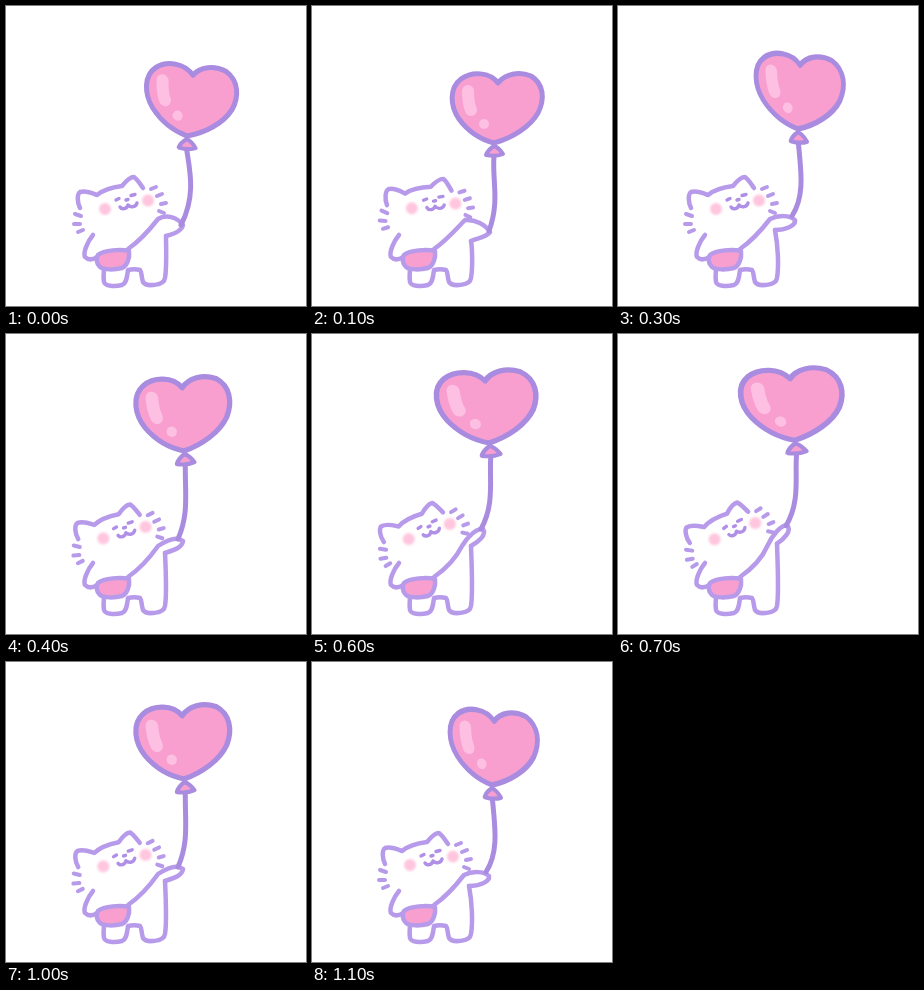
Recreate the animation shown at these times as an HTML page. Size 300 px wide and 300 px high, loop 1200 ms.

```html
<!DOCTYPE html>
<html lang="en">
<head>
<meta charset="utf-8">
<title>Cat with a heart balloon</title>
<style>
html, body { margin: 0; width: 100%; height: 100%; overflow: hidden; background: #fff; }
svg { display: block; width: 100vw; height: 100vh; }
path { fill: none; stroke-linecap: round; stroke-linejoin: round; }
.cat { stroke: #b79bea; stroke-width: 4.5; }
.fur { stroke: #b79bea; stroke-width: 4; }
.face { stroke: #b08fe6; stroke-width: 3.4; }
.balloon { stroke: #a98ce0; stroke-width: 5; }
.pink { fill: #f89fd0; }
.shine { stroke: #fdc0e2; stroke-width: 12; }
.dot { stroke: #fdc0e2; stroke-width: 10; }
.blush { stroke: #ffc6de; stroke-width: 12; filter: blur(1px); }
</style>
</head>
<body>
<svg viewBox="0 0 300 300">
  <path class="cat" id="body"/>
  <path class="cat" d="M87 229C81 236 77 247 79 251C83 255 88 253 91 251"/>
  <path class="cat" id="arm"/>
  <path class="cat pink" d="M92 249C98 244 115 243 123 245C124 252 121 260 116 262C108 264 98 264 94 261C90 257 90 252 92 249Z"/>
  <g id="head">
    <path class="cat" d="M73 202C70 196 70 188 73 186C79 184 85 187 90 189C97 183 107 181 115 180C119 175 123 171 127 171C131 174 133 178 136 182"/>
    <path class="fur" d="M68 208L74 210M67 218L73 218M71 226L76 224M144 183L149 181M150 190L155 188M154 198L159 197M152 205L157 207"/>
    <path class="blush" d="M98 203h.01M141 194.500h.01"/>
    <path class="face" d="M109 194l3-1.500M124 189.500l4-1M119 194l2-.5M113 201c2 3 7 2 8-2c3 3 8 2 9-2"/>
  </g>
  <path class="balloon" id="string"/>
  <!-- balloon coordinates are relative to the heart's lower tip -->
  <g id="balloon">
    <path class="balloon pink" d="M4-60C-4-71-22-72-33-64C-45-55-44-37-35-24C-27-13-15-4 0 0C18-5 36-16 44-30C51-44 50-59 37-67C25-72 11-69 4-60Z"/>
    <path class="shine" d="M-26-52Q-26-40-23-33"/>
    <path class="dot" d="M-10-19h.01"/>
    <path class="balloon pink" d="M0 3C-3 5-7 9-8 12C-3 13 4 13 9 11C7 8 3 4 0 3Z" style="stroke-width:4"/>
  </g>
</svg>
<script>
const $ = id => document.getElementById(id);

// balloon: matrix; head: turn, x, y; string: curve end; arm: shoulder and two curves
const low = {
  balloon: [1, 0, 0, 1, 182, 137],
  head: [5, 2, 1],
  string: [180, 175, 188, 195, 177, 225],
  arm: [153, 214, 163, 213, 174, 219, 178, 226, 175, 231, 166, 232, 159, 235]
};
const rise = {
  balloon: [1, .1, -.03, 1.02, 181, 130],
  head: [0, 1, 0],
  string: [184, 165, 190, 190, 175, 219],
  arm: [152, 213, 160, 208, 171, 211, 177, 219, 176, 225, 168, 228, 160, 230]
};
const mid = {
  balloon: [.97, .09, .03, 1.07, 180, 123],
  head: [0, 0, 0],
  string: [183, 165, 187, 190, 174, 210],
  arm: [152, 213, 160, 209, 172, 209, 177, 214, 178, 220, 167, 224, 157, 224]
};
const high = {
  balloon: [1.04, -.06, .1, 1.05, 178, 117],
  head: [-4, -1, 0],
  string: [179, 160, 183, 180, 172, 205],
  arm: [152, 212, 161, 206, 171, 202, 177, 207, 176, 214, 168, 216, 159, 219]
};
const tall = {
  balloon: [1.1, -.06, .14, 1.03, 177, 109],
  head: [-9, -2, -1],
  string: [177, 145, 183, 170, 169, 195],
  arm: [150, 212, 156, 202, 165, 194, 171, 195, 175, 201, 166, 208, 159, 212]
};

const mix = (a, b, k) => Object.fromEntries(Object.keys(a).map(
  key => [key, a[key].map((v, i) => v + (b[key][i] - v) * k)]));
const climb = [low, rise, mid, high, mix(high, tall, .5), tall, mix(high, tall, 1.33)];
const STEP = 100, COUNT = 12;

function draw(pose) {
  const [a, b, c, d, e, f] = pose.balloon;
  const [turn, x, y] = pose.head;
  const [sx, sy, ...curve] = pose.arm;
  const hand = pose.arm.slice(-2);
  $('balloon').setAttribute('transform', `matrix(${[a, b, c, d, e, f]})`);
  $('head').setAttribute('transform', `translate(${x} ${y}) rotate(${turn} 118 200)`);
  $('string').setAttribute('d', `M${e + c * 13} ${f + d * 13}C${pose.string}`);
  $('arm').setAttribute('d', `M122 243C135 234 145 222 ${sx} ${sy}C${curve}`);
  $('body').setAttribute('d', `M${hand}C160 240 161 260 159 272C158 280 140 281 137 276` +
    'C135 270 136 266 134 264C130 263 126 263 122 264C121 270 121 277 116 279C108 281 99 280 98 276C97 270 98 266 98 262');
}

function tick(now) {
  const step = Math.floor(now / STEP) % COUNT;
  draw(climb[step <= 7 ? Math.abs(step - 1) : 13 - step]);
  requestAnimationFrame(tick);
}
draw(rise);
requestAnimationFrame(tick);
</script>
</body>
</html>
```
